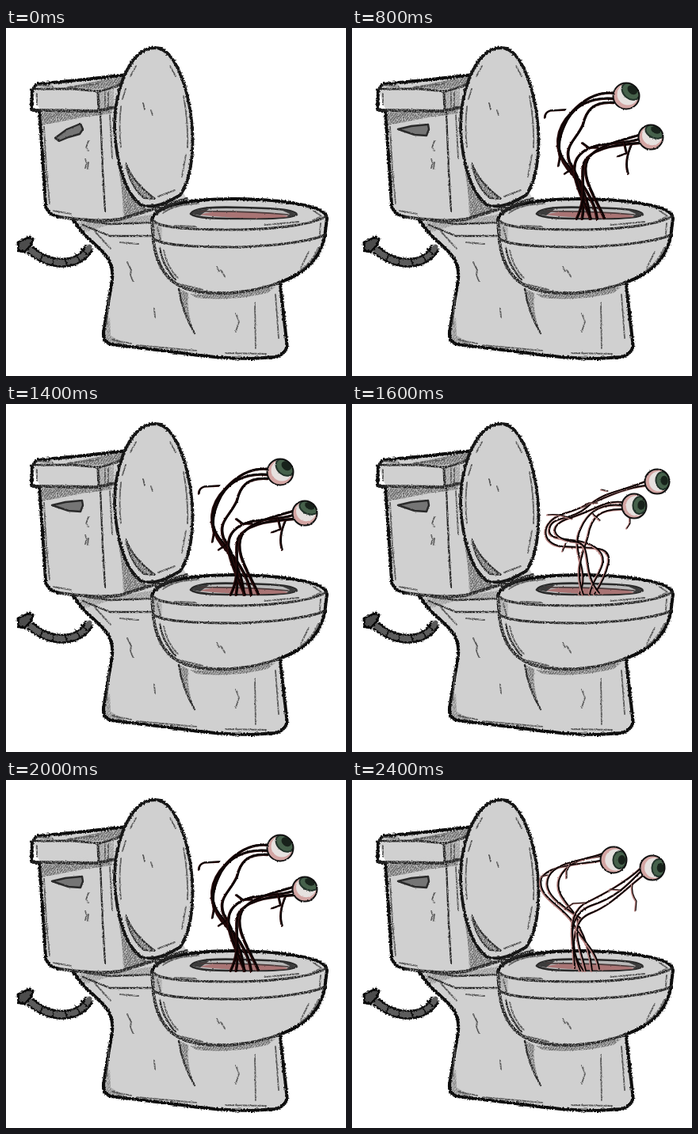
An HTML page for the animation above (2600 ms loop, 429 px wide and 440 px high).

```html
<!DOCTYPE html>
<html lang="en">
<head>
<meta charset="utf-8">
<title>Eyes in the bowl</title>
<style>
  html, body { margin: 0; width: 100%; height: 100%; overflow: hidden; background: #fff; }
  svg { display: block; width: 100%; height: 100%; }
  path { stroke-linecap: round; stroke-linejoin: round; }
  .body { fill: #d0d0d0; }
  .edge { fill: none; stroke: #0d0d0d; stroke-width: 4; }
  .line { fill: none; stroke: #262626; stroke-width: 3.2; }
  .thin { fill: none; stroke: #555; stroke-width: 1.9; }
  .hatch { fill: url(#hatch); }
  .handle { fill: #757575; stroke: #2a2a2a; stroke-width: 2.4; }
</style>
</head>
<body>
<svg viewBox="0 0 429 440">
  <defs>
    <filter id="rough" filterUnits="userSpaceOnUse" x="0" y="0" width="429" height="440" color-interpolation-filters="sRGB">
      <feTurbulence type="fractalNoise" baseFrequency=".5" numOctaves="2" seed="4"/>
      <feDisplacementMap in="SourceGraphic" scale="3.6" xChannelSelector="R" yChannelSelector="G"/>
    </filter>
    <filter id="pencil" filterUnits="userSpaceOnUse" x="0" y="0" width="429" height="440" color-interpolation-filters="sRGB">
      <feTurbulence type="fractalNoise" baseFrequency=".6" numOctaves="2" seed="9" result="n"/>
      <feDisplacementMap in="SourceGraphic" in2="n" scale="2.2" xChannelSelector="R" yChannelSelector="G" result="d"/>
      <feColorMatrix in="n" values="0 0 0 0 0  0 0 0 0 0  0 0 0 0 0  0 0 0 3 -.6" result="g"/>
      <feComposite in="d" in2="g" operator="in"/>
    </filter>
    <filter id="ink" filterUnits="userSpaceOnUse" x="0" y="0" width="429" height="440" color-interpolation-filters="sRGB">
      <feTurbulence type="fractalNoise" baseFrequency=".35" numOctaves="2" seed="2"/>
      <feDisplacementMap in="SourceGraphic" scale="2" xChannelSelector="R" yChannelSelector="G"/>
    </filter>
    <pattern id="hatch" width="2.6" height="8" patternUnits="userSpaceOnUse" patternTransform="rotate(38)">
      <rect width="2.6" height="8" fill="#8d8d8d" opacity=".65"/>
      <path d="M1 0V8" stroke="#444" stroke-width="1"/>
    </pattern>
    <clipPath id="inBowl"><path d="M200 0H429V236H368C350 242 325 243 300 243S255 243 235 236H200Z"/></clipPath>
  </defs>

  <!-- hose -->
  <g filter="url(#rough)">
    <path d="M105 277C96 299 60 306 30 280" fill="none" stroke="#0c0c0c" stroke-width="12" style="stroke-linecap:butt"/>
    <path d="M105 277C96 299 60 306 30 280" fill="none" stroke="#5c5c5c" stroke-width="7"/>
    <path class="edge" style="stroke-width:1.8" d="M46 287L43 295M60 291L59 300M74 291L77 299M87 285L93 294M95 279L102 286"/>
    <path d="M15 271L30 264L34 267L32 274L24 283L16 282Z" fill="#4c4c4c" stroke="#080808" stroke-width="3"/>
  </g>

  <!-- flat colour -->
  <g class="body">
    <path d="M84 242L97 259L122 283Q136 297 134 318L123 384Q122 397 132 400L215 410Q265 418 310 418L340 416Q357 411 354 396L346 320L240 220Z"/>
    <path d="M33 78L39 71L150 60V100L43 105Z"/>
    <path d="M42 104L46 160L50 224Q52 236 68 239Q115 246 143 242L228 216L160 90Z"/>
    <path d="M184 242C190 223 235 216 290 216C352 217 406 225 405 241L402 264C396 292 378 310 345 322C308 336 260 340 226 329C202 320 190 300 186 270Z"/>
  </g>

  <!-- soft shading -->
  <g filter="url(#pencil)">
    <path class="hatch" d="M45 107L134 103V108L96 113L45 123Z"/>
    <path class="hatch" d="M70 76L146 61V71L118 77Z"/>
    <path class="hatch" d="M115 81L136 77V102L116 104Z" opacity=".5"/>
    <path class="hatch" d="M140 168Q147 205 171 224L183 231L148 242Q148 205 140 168Z"/>
    <path class="hatch" d="M90 246L134 244L184 236L184 246L130 249L100 258Z" opacity=".55"/>
    <path class="hatch" d="M217 329L230 335Q227 355 238 388Q220 358 217 329Z"/>
    <path class="hatch" d="M232 336Q288 341 340 327L330 335Q285 346 240 341Z"/>
    <path class="hatch" d="M123 385L131 365L132 389L155 402L127 399Z" opacity=".7"/>
    <path class="hatch" d="M185 240L197 252L196 272L187 269Z" opacity=".4"/>
  </g>

  <!-- lines -->
  <g filter="url(#rough)">
    <path class="edge" d="M33 78L39 71L100 65L152 59M33 78L32 103L43 105M42 106L46 160L50 224Q52 236 68 239"/>
    <path class="edge" d="M84 242L97 259L122 283Q136 297 134 318L123 384Q122 397 132 400L215 410Q265 418 310 418L340 416Q357 411 354 396L346 324"/>
    <path class="edge" d="M184 242C190 223 235 216 290 216C352 217 406 225 405 241L402 264C396 292 378 310 345 322"/>
  </g>
  <g filter="url(#pencil)">
    <path class="line" style="stroke-width:4" d="M184 242L186 270C190 300 202 320 226 329C260 340 308 336 345 322M68 239Q115 246 143 242L228 216M34 104L116 105L132 101L144 100"/>
    <path class="line" d="M34 77L85 77L118 80L145 72M116 80L117 105"/>
    <path class="line" d="M184 243C196 255 250 255 297 255C345 254 388 248 404 238M186 267C206 277 255 277 297 277C345 275 388 269 403 261"/>
    <path class="line" style="stroke-width:2.4" d="M119 107L122 180L125 231M97 249L131 263L185 263M102 244L132 248L184 246M218 330Q222 358 238 386M194 278Q198 302 214 318"/>
    <path class="thin" d="M39 72L60 74M78 75L117 70M125 82V102M129 81V100M39 83V97M48 125L51 180L55 222M60 231L82 235M131 110L134 165"/>
    <path class="thin" d="M104 143L101 151L104 155M100 166L102 171L100 177M104 170L103 178"/>
    <path class="thin" d="M153 296L158 306L157 312L160 320M187 355L188 365M290 361L294 371L290 384M314 347L315 405M340 337L344 392M134 394L158 399M165 401L240 408M277 411L328 412"/>
    <path class="thin" d="M266 302L269 308M271 306L276 314M199 281Q203 303 217 316M382 283L372 303M394 278Q387 295 371 307M220 324L248 331M130 339L127 375M112 257L132 279M144 271L167 273"/>
    <path class="thin" d="M198 234Q212 223 243 222M213 250L240 251M326 249L369 245M388 231L398 238L387 243M191 252L195 267M397 247L396 261"/>
    <path class="line" d="M174 231L188 229L191 235M182 224L194 228L218 220M188 222L204 224M191 232L211 224"/>
  </g>

  <!-- bowl opening -->
  <g filter="url(#ink)">
    <path d="M233 235C238 226 268 226 300 227C335 228 365 229 367 236C360 241 325 241 298 241C267 241 240 241 233 235Z" fill="#b9b9b9" stroke="#2a2a2a" stroke-width="2.6"/>
    <path d="M244 236C260 231 280 232 302 233C329 233 347 234 357 239Q300 243 244 236Z" fill="#a97474"/>
    <path d="M234 235Q240 228 256 229L245 237ZM347 230Q361 231 366 236L354 239L358 235Z" fill="#3c3c3c"/>
    <path d="M246 232Q300 231 356 236" fill="none" stroke="#4a3a3a" stroke-width="1.7"/>
  </g>

  <!-- raised lid -->
  <g filter="url(#rough)">
    <path d="M188 25C213 25 231 76 235 127C237 163 232 194 220 211C205 220 187 229 171 224C151 210 139 172 137 127C137 72 159 25 188 25Z" class="body" style="stroke:#161616;stroke-width:3.8"/>
  </g>
  <g filter="url(#pencil)">
    <path class="hatch" d="M151 171Q160 195 188 216L174 215Q157 201 151 171Z"/>
    <path class="line" style="stroke-width:2.2" d="M151 171Q160 195 188 216L174 215Q157 201 151 171"/>
    <path class="thin" d="M173 95L175 103M183 104L185 110M145 99Q142 127 145 151M151 77L147 90M224 86Q230 118 229 151M227 160L222 188M164 48L157 61M192 213L213 205M207 48L214 61"/>
  </g>

  <g id="poses"></g>
</svg>

<script>
const STEP = 200;
const ORDER = ['flush', 'still', 'peek', 'rise', 'tall', 'reach', 'split',
               'tall', 'reach', 'split', 'tall', 'reach', 'split'];

// ball centre and radius, then iris centre, radii and tilt; the iris is cut off by the ball
let eyes = 0;
function eye(x, y, r, ix, iy, rx, ry, tilt = 0) {
  const id = 'ball' + eyes++;
  const wx = x + (ix - x) * .35, wy = y + (iy - y) * .35;
  const px = ix + (ix - x) * .3, py = iy + (iy - y) * .3;
  const turn = (cx, cy) => `rotate(${tilt} ${cx} ${cy})`;
  return `<clipPath id="${id}"><circle cx="${x}" cy="${y}" r="${r}"/></clipPath>
    <g clip-path="url(#${id})">
      <circle cx="${x}" cy="${y}" r="${r}" fill="#d3a5a3"/>
      <circle cx="${wx}" cy="${wy}" r="${r * .82}" fill="#e6e1df"/>
      <ellipse cx="${ix}" cy="${iy}" rx="${rx}" ry="${ry}" transform="${turn(ix, iy)}"
        fill="#46614b" stroke="#22332a" stroke-width="2"/>
      <ellipse cx="${px}" cy="${py}" rx="${rx * .55}" ry="${ry * .55}" transform="${turn(px, py)}" fill="#18221b"/>
    </g>
    <circle cx="${x}" cy="${y}" r="${r}" fill="none" stroke="#111" stroke-width="2"/>`;
}

const strands = (list, width, glow) => list.map(d =>
  `<path d="${d}" transform="translate(-1 .6)" fill="none" stroke="${glow}" stroke-width="${width + .8}"/>
   <path d="${d}" fill="none" stroke="#0b0303" stroke-width="${width}"/>`).join('');

const PINK = '#b98583', BLOOD = '#2c0d0d';

const POSES = {
  peek: strands(['M315 224L317 243', 'M321 225L323 243', 'M327 223L329 243'], 2, PINK) +
    eye(274, 230, 17, 274, 221, 10, 8.5) + eye(319, 208, 17, 317, 200, 11, 9),

  rise: strands([
    'M264 174C267 198 284 207 287 242', 'M269 175C275 198 291 213 295 242',
    'M273 172C284 196 280 219 301 242', 'M328 130C320 164 301 187 305 242',
    'M333 131C329 165 311 194 312 242', 'M337 128C338 166 322 191 320 242'], 2, PINK) +
    eye(267, 158, 17, 266, 149, 10, 8.5) + eye(330, 115, 17, 329, 106, 11, 9),

  tall: strands([
    'M331 89C300 86 281 100 272 116C254 150 262 166 279 185C294 202 299 221 301 241',
    'M333 82C309 79 290 93 278 106C256 128 257 152 269 169C286 190 306 213 310 241',
    'M331 94C304 92 296 105 292 122C283 142 268 148 275 169C288 191 296 211 291 241',
    'M363 140C338 149 305 141 288 160C273 176 285 202 302 241',
    'M364 145C336 147 312 150 297 164C284 180 301 207 284 241',
    'M363 135C335 143 306 150 298 166C288 187 307 213 319 240'], 2.3, BLOOD) +
    strands(['M270 103L251 104Q244 106 244 113', 'M260 148L263 163L261 174',
      'M311 151L299 151L291 145', 'M344 145L347 158L336 162',
      'M353 148Q344 168 349 184', 'M279 177L269 184'], 1.6, BLOOD) +
    eye(346, 86, 16.5, 352, 80, 12.5, 9.5, 40) + eye(377, 138, 15.5, 382, 131, 12, 8, 22),

  reach: strands([
    'M371 103C337 106 303 128 266 139C237 149 238 177 265 180C302 183 327 177 324 200Q319 222 306 240',
    'M370 98C336 112 319 110 297 130C276 149 250 140 249 160C249 176 284 166 307 181C332 199 302 219 300 241',
    'M341 128C314 125 298 136 289 157C274 186 302 210 287 240',
    'M342 133C314 132 302 142 298 167C292 189 280 208 292 241',
    'M342 124C319 121 308 134 275 144C244 154 255 172 281 174C306 176 288 211 312 239'], 1.9, PINK) +
    strands(['M278 145Q261 138 247 140', 'M310 125L299 125L290 130', 'M270 176L266 186',
      'M351 143L351 151L347 157', 'M323 110L315 108', 'M304 139L313 147'], 1.2, PINK) +
    eye(356, 129, 15.5, 363, 128, 8.5, 11, 5) + eye(385, 98, 15.5, 392, 97, 8.5, 11, -5),

  split: strands([
    'M314 96C288 99 270 106 262 124C253 150 287 164 286 184Q300 210 303 241',
    'M313 102C277 108 249 108 239 124C233 148 265 158 279 180C287 201 308 212 312 239',
    'M316 93C289 103 259 103 249 121C238 142 263 158 289 175Q270 211 292 241',
    'M365 115C347 134 332 149 301 159C272 171 274 205 288 241',
    'M367 121C344 139 327 158 302 168C272 180 287 207 295 241',
    'M365 111C345 130 318 144 292 157C270 174 280 201 281 238'], 1.9, PINK) +
    strands(['M354 132Q352 143 359 153L358 165', 'M294 155L279 156L269 163',
      'M276 106L271 115L271 124', 'M338 139L326 138', 'M247 120L239 122'], 1.2, PINK) +
    eye(330, 101, 16.5, 338, 101, 8.5, 11, 3) + eye(379, 111, 15.5, 387, 111, 8.5, 11, 3),
};

const HANDLES = {
  flush: 'M62 139L77 128L94 121L97 128L93 134L79 138L67 143Z',
  level: 'M58 128L75 124L96 122L97 128L94 136L79 135Z',
};

const stage = document.getElementById('poses');

function add(markup, filter, isOn) {
  const g = document.createElementNS('http://www.w3.org/2000/svg', 'g');
  g.setAttribute('filter', `url(#${filter})`);
  g.innerHTML = markup;
  stage.append(g);
  const steps = [...ORDER, ORDER[ORDER.length - 1]].map((name, i) => ({
    offset: i / ORDER.length,
    visibility: isOn(name) ? 'visible' : 'hidden',
    easing: 'steps(1, end)',
  }));
  g.animate(steps, { duration: STEP * ORDER.length, iterations: Infinity }).startTime = 0;
}

for (const [name, d] of Object.entries(HANDLES))
  add(`<path class="handle" d="${d}"/>`, 'ink', now => (now === 'flush') === (name === 'flush'));

for (const [name, art] of Object.entries(POSES))
  add(`<g clip-path="url(#inBowl)">${art}</g>`, 'ink', now => now === name);
</script>
</body>
</html>
```
